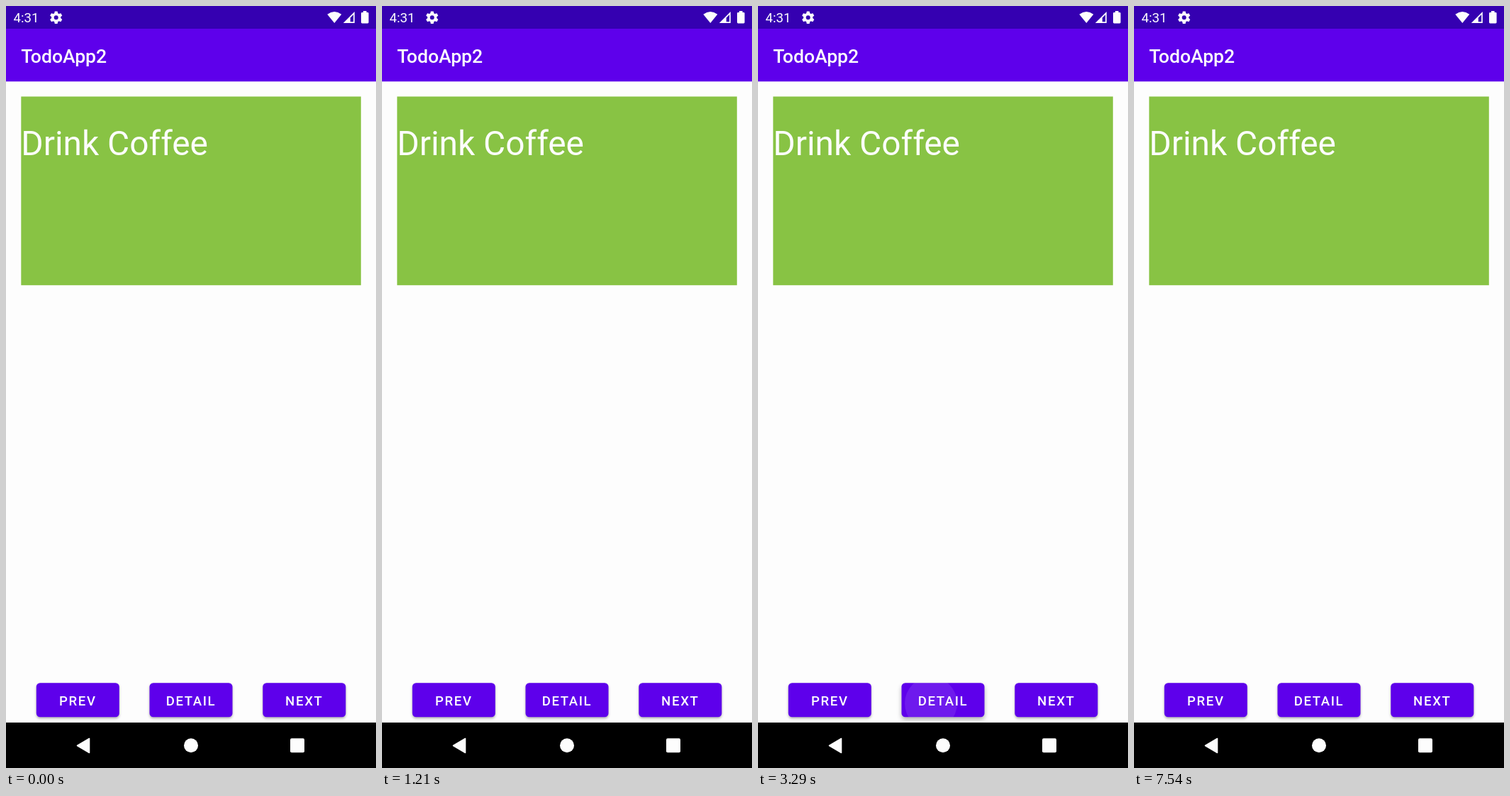
Animation of 522 by 1073 pixels, one loop 8 s. Source, as an HTML page with a canvas:

```html
<!DOCTYPE html>
<html lang="en">
<head>
<meta charset="utf-8">
<title>TodoApp2</title>
<style>
html, body { margin: 0; width: 100%; height: 100%; overflow: hidden; background: #fdfdfd; }
canvas { display: block; width: 522px; height: 1073px; }
</style>
</head>
<body>
<canvas id="stage" width="522" height="1073"></canvas>
<script>
const ctx = document.getElementById('stage').getContext('2d');
const LOOP = 8000;
const WHITE = '#fdfdfd', PRIMARY = '#5e00eb', DARK = '#3500b1', GREEN = '#88c344';
const BUTTON = { y: 953.3, w: 117, h: 47.9, r: 5.3 };

function rect(x, y, w, h, color) {
  ctx.fillStyle = color;
  ctx.fillRect(x, y, w, h);
}

function roundRect(x, y, w, h, r, color) {
  ctx.fillStyle = color;
  ctx.beginPath();
  ctx.roundRect(x, y, w, h, r);
  ctx.fill();
}

function circle(x, y, r, color) {
  ctx.fillStyle = color;
  ctx.beginPath();
  ctx.arc(x, y, r, 0, Math.PI * 2);
  ctx.fill();
}

function polygon(points, color) {
  ctx.fillStyle = color;
  ctx.beginPath();
  points.forEach(([x, y]) => ctx.lineTo(x, y));
  ctx.closePath();
  ctx.fill();
}

function text(str, x, y, size, weight = 400, align = 'left', spacing = 0) {
  ctx.font = `${weight} ${size}px Roboto, sans-serif`;
  ctx.letterSpacing = spacing + 'px';
  ctx.textAlign = align;
  ctx.fillStyle = WHITE;
  ctx.fillText(str, x, y);
}

function gear(x, y) {
  ctx.save();
  ctx.translate(x, y);
  circle(0, 0, 6.5, WHITE);
  for (let i = 0; i < 6; i++) {
    polygon([[-2.7, -5], [-1.9, -8.8], [1.9, -8.8], [2.7, -5]], WHITE);
    ctx.rotate(Math.PI / 3);
  }
  circle(0, 0, 3, DARK);
  ctx.restore();
}

function wifi(x, y) {
  ctx.fillStyle = WHITE;
  ctx.beginPath();
  ctx.moveTo(x, y);
  ctx.lineTo(x - 10, y - 12.2);
  ctx.quadraticCurveTo(x, y - 19.6, x + 10, y - 12.2);
  ctx.closePath();
  ctx.fill();
}

function signal(x, y) {
  polygon([[x, y], [x + 16, y - 16], [x + 16, y]], WHITE);
  polygon([[x + 10, y - 7.5], [x + 14.3, y - 11.8], [x + 14.3, y - 1.7], [x + 10, y - 1.7]], DARK);
}

function battery(x, y) {
  roundRect(x, y + 2, 10.6, 15.5, 1.4, WHITE);
  rect(x + 3, y, 4.6, 3, WHITE);
}

function statusBar() {
  rect(0, 0, 522, 32, DARK);
  text('4:31', 10.6, 23, 18.6);
  gear(70.7, 16.2);
  wifi(463.3, 24);
  signal(475.8, 24);
  battery(501, 7);
}

function navBar() {
  rect(0, 1009, 522, 64, '#000');
  polygon([[100.5, 1041.5], [117.5, 1031.5], [117.5, 1051.5]], WHITE);
  ctx.strokeStyle = WHITE;
  ctx.lineWidth = 1.6;
  ctx.lineJoin = 'round';
  ctx.stroke();
  circle(261, 1041.3, 10, WHITE);
  roundRect(401, 1031.2, 20, 20, 2, WHITE);
}

function button(label, x, raised, ripple) {
  const { y, w, h, r } = BUTTON;
  ctx.save();
  ctx.shadowColor = 'rgba(0,0,0,.3)';
  ctx.shadowOffsetY = raised ? 3.5 : 2;
  ctx.shadowBlur = raised ? 6 : 3.5;
  roundRect(x, y, w, h, r, PRIMARY);
  ctx.restore();
  if (ripple) {
    ctx.save();
    ctx.beginPath();
    ctx.roundRect(x, y, w, h, r);
    ctx.clip();
    circle(244, 982, ripple.radius, `rgba(255,255,255,${ripple.alpha})`);
    ctx.restore();
  }
  text(label, x + w / 2, 984.6, 18.6, 500, 'center', 1.66);
}

// The press is shown in discrete steps: touch, spread, fade.
function pressAt(t) {
  if (t < 3290 || t >= 4920) return null;
  if (t < 4170) return { radius: 37, alpha: 0.1 };
  if (t < 4500) return { radius: 90, alpha: 0.1 };
  return { radius: 90, alpha: 0.04 };
}

function draw(t) {
  rect(0, 0, 522, 1073, WHITE);
  rect(0, 32, 522, 74.3, PRIMARY);
  statusBar();
  text('TodoApp2', 21.3, 79.6, 26.6, 500);

  rect(21.3, 127.5, 479.5, 265.7, GREEN);
  text('Drink Coffee', 21.3, 210, 47.85);

  const press = pressAt(t);
  button('PREV', 42.8, false);
  button('DETAIL', 202.5, press && t < 4500, press);
  button('NEXT', 362.3, false);
  navBar();
}

function tick(now) {
  draw(now % LOOP);
  requestAnimationFrame(tick);
}
requestAnimationFrame(tick);
</script>
</body>
</html>
```
